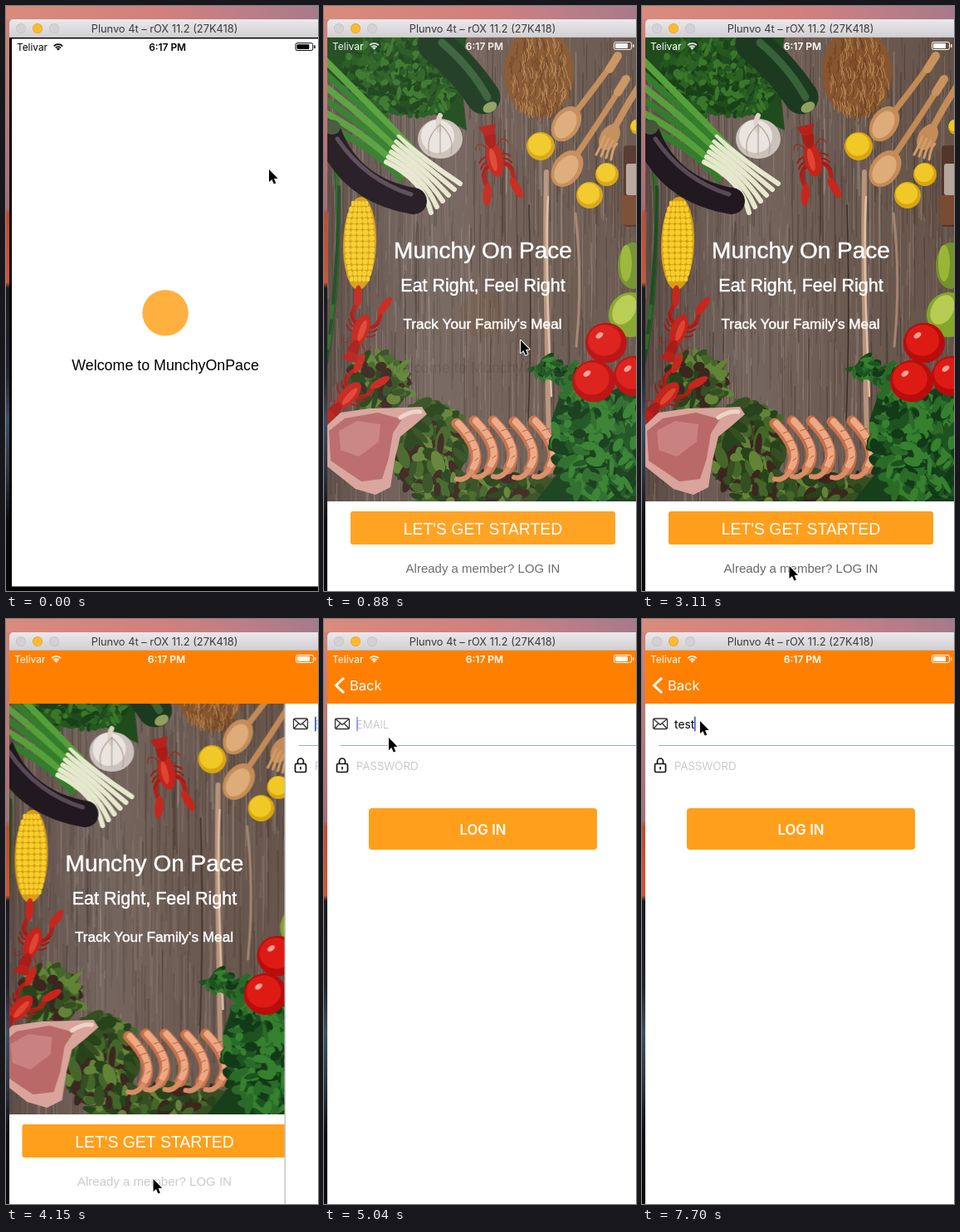
Animation of 376x705 px, one loop 8 s. Source, as an HTML page with a canvas:

```html
<!DOCTYPE html>
<html lang="en">
<head>
<meta charset="utf-8">
<title>App walkthrough</title>
<style>
html, body { margin: 0; width: 100%; height: 100%; overflow: hidden; background: #000; }
canvas { display: block; }
</style>
</head>
<body>
<canvas id="stage" width="376" height="705"></canvas>
<script>
const W = 376, H = 705, LOOP = 8000, TICK = 148;
const SANS = '"Liberation Sans", Arial, sans-serif', UI = 'Inter, sans-serif';
const NAV = '#ff8000', BUTTON = '#ff9f1c';
const stage = document.getElementById('stage').getContext('2d');
let g = stage;

function layer(paint) {
  const canvas = document.createElement('canvas');
  canvas.width = W; canvas.height = H;
  const previous = g;
  g = canvas.getContext('2d');
  paint();
  g = previous;
  return canvas;
}

function seeded(seed) {
  return () => (seed = (seed * 16807) % 2147483647) / 2147483647;
}

function group(paint, { alpha = 1, dx = 0 } = {}) {
  g.save();
  g.globalAlpha *= alpha;
  g.translate(dx, 0);
  paint();
  g.restore();
}

function box(x, y, w, h, color, r = 0) {
  g.fillStyle = color;
  g.beginPath();
  g.roundRect(x, y, w, h, r);
  g.fill();
}

function oval(x, y, rx, ry, color, angle = 0) {
  g.fillStyle = color;
  g.beginPath();
  g.ellipse(x, y, rx, ry, angle, 0, 7);
  g.fill();
}

function shape(points, color) {
  g.fillStyle = color;
  g.beginPath();
  points.forEach(([x, y]) => g.lineTo(x, y));
  g.closePath();
  g.fill();
}

function curve(x1, y1, cx, cy, x2, y2, width, color) {
  g.strokeStyle = color;
  g.lineWidth = width;
  g.lineCap = 'round';
  g.beginPath();
  g.moveTo(x1, y1);
  g.quadraticCurveTo(cx, cy, x2, y2);
  g.stroke();
}

function text(str, x, y, size, color, { font = SANS, weight = 400, align = 'left', heft = 0 } = {}) {
  g.font = `${weight} ${size}px ${font}`;
  g.textAlign = align;
  g.fillStyle = g.strokeStyle = color;
  g.fillText(str, x, y);
  if (heft) { g.lineWidth = heft; g.strokeText(str, x, y); }
}

function gradient(x1, y1, x2, y2, ...stops) {
  const fill = g.createLinearGradient(x1, y1, x2, y2);
  stops.forEach(([at, color]) => fill.addColorStop(at, color));
  return fill;
}

// Food photograph, reduced to flat shapes

function foliage(seed, count, x, y, rx, ry, colors, size) {
  const rnd = seeded(seed);
  for (let i = 0; i < count; i++) {
    const a = rnd() * 6.28, d = Math.sqrt(rnd());
    oval(x + Math.cos(a) * d * rx, y + Math.sin(a) * d * ry, size * (0.5 + rnd()), size * (0.3 + rnd() * 0.4),
      colors[Math.floor(rnd() * colors.length)], rnd() * 3);
  }
}

function wood() {
  box(4, 38, W, 559, gradient(4, 0, W, 0, [0, '#5c4c45'], [0.35, '#75665f'], [0.6, '#6c5b52'], [1, '#66544a']));
  const rnd = seeded(77);
  for (let i = 0; i < 800; i++) {
    const x = 4 + rnd() * 372, y = 20 + rnd() * 560, len = 25 + rnd() * 110;
    g.globalAlpha = 0.15 + rnd() * 0.3;
    curve(x, y, x + rnd() * 4 - 2, y + len / 2, x, y + len, 0.6 + rnd(), rnd() < 0.55 ? '#3b2c27' : '#a99a90');
  }
  g.globalAlpha = 1;
  curve(247, 240, 251, 380, 246, 500, 1.5, '#3a2b24');
  curve(268, 200, 266, 300, 271, 520, 6, '#b7937b');
  curve(270, 230, 266, 300, 274, 470, 2.5, '#e0c0a6');
  curve(303, 250, 312, 330, 304, 410, 3, '#a58470');
}

function crayfish(x, y, angle, scale) {
  g.save();
  g.translate(x, y);
  g.rotate(angle);
  g.scale(scale, scale);
  for (const side of [-1, 1]) {
    curve(side * 4, -8, side * 16, -26, side * 20, -12, 1.2, '#a82019');
    curve(side * 5, 8, side * 22, 14, side * 16, 34, 5, '#b51d17');
    oval(side * 18, 43, 5, 14, '#c8261d', side * -0.3);
    for (let i = 0; i < 3; i++) curve(0, i * 6, side * 14, i * 6 - 4, side * 19, i * 8 + 4, 2, '#9d1c17');
  }
  oval(0, 4, 10, 21, '#c4241c');
  oval(0, -23, 7, 13, '#a91c17');
  shape([[-11, -38], [11, -38], [5, -26], [-5, -26]], '#b8211a');
  oval(-2, 4, 4, 14, '#de4632');
  g.restore();
}

function utensil(hx, hy, rx, ry, angle, ex, ey) {
  curve(hx, hy, (hx + ex) / 2, (hy + ey) / 2 + 3, ex, ey, 7, '#c28a55');
  curve(ex, ey, ex, ey, ex - 10, ey + 16, 10, '#c9935e');
  oval(hx, hy, rx, ry, '#c58c57', angle);
  oval(hx - 1, hy + 1, rx * 0.72, ry * 0.78, '#ddac78', angle);
}

function lemon(x, y, r) {
  oval(x, y, r, r, '#d9a512');
  oval(x - 1, y - 2, r * 0.82, r * 0.8, '#f1c927');
}

function tomato(x, y, r) {
  oval(x, y, r, r * 0.97, '#b80d0d');
  oval(x - 2, y - 3, r * 0.8, r * 0.75, '#dd1b14');
  oval(x - 8, y - 9, 5, 3, '#f4a394', -0.6);
}

function shrimp(x, y) {
  curve(x, y, x + 34, y + 34, x + 18, y + 58, 13, '#c9714a');
  curve(x + 2, y, x + 33, y + 32, x + 20, y + 53, 8, '#eda984');
  curve(x + 18, y + 58, x + 10, y + 70, x, y + 67, 6, '#d98d66');
  for (let i = 0; i < 4; i++) curve(x + 10 + i * 4, y + 12 + i * 11, x + 14 + i * 3, y + 10 + i * 11, x + 20 + i * 2, y + 9 + i * 11, 1, '#b65b38');
}

function photo() {
  g.save();
  g.beginPath();
  g.rect(4, 38, W, 559);
  g.clip();
  wood();

  for (let i = 0; i < 5; i++) curve(6 + i * 3, 130 + i * 22, 30 - i * 3, 280, 3 + i * 2, 430 - i * 18, 4, i % 2 ? '#2f6b27' : '#1f4d20');
  shape([[4, 38], [172, 38], [164, 76], [172, 150], [128, 128], [88, 132], [50, 108], [4, 86]], '#1f4b1d');
  foliage(11, 420, 98, 80, 76, 54, ['#194118', '#2b6122', '#3a772b', '#245820'], 6);

  curve(133, 46, 165, 70, 192, 110, 41, '#1c3a20');
  curve(142, 44, 178, 75, 197, 110, 9, '#39613a');
  oval(200, 122, 9, 6, '#91a05d', -0.5);

  for (let i = 0; i < 6; i++) {
    const y = 64 + i * 16, ex = 164 - i * 7, ey = 214 + i * 6;
    curve(0, y, 58, 122 + i * 9, 112 - i * 4, 178 + i * 6, 8, i % 2 ? '#347d2c' : '#56a03a');
    curve(90 - i * 3, 158 + i * 6, 120, 185 + i * 5, ex, ey + i, 6, '#e6e8cd');
  }
  curve(6, 155, 32, 222, 108, 235, 32, '#211820');
  curve(16, 160, 50, 210, 105, 227, 5, '#574a55');
  oval(10, 146, 10, 9, '#46563a');

  oval(140, 160, 27, 24, '#cbc2bb');
  oval(137, 157, 20, 20, '#ebe4de');
  curve(139, 150, 136, 138, 140, 132, 6, '#ded3c6');
  for (const dx of [-13, 0, 13]) curve(140, 143, 140 + dx * 1.4, 158, 140 + dx, 178, 1.2, '#afa29c');

  oval(259, 80, 42, 54, '#87562f');
  const rnd = seeded(31);
  for (let i = 0; i < 180; i++) {
    const a = rnd() * 6.28, d = Math.sqrt(rnd()), x = 259 + Math.cos(a) * d * 38, y = 80 + Math.sin(a) * d * 50;
    curve(x, y, x + 3, y + 6, x + rnd() * 8 - 4, y + 13, 1, rnd() < 0.5 ? '#6c4223' : '#b98552');
  }

  utensil(292, 142, 16, 23, 0.55, 354, 60);
  utensil(293, 196, 17, 24, 0.6, 364, 88);
  curve(344, 160, 358, 130, 380, 96, 8, '#c48c58');
  oval(344, 158, 11, 17, '#c48c58', 0.55);
  for (let i = 0; i < 4; i++) curve(338 + i * 5, 157 + i * 3, 333 + i * 5, 170, 328 + i * 6, 179 + i * 2, 3, '#d29c67');
  lemon(261, 169, 17); lemon(341, 203, 14); lemon(320, 228, 16); lemon(378, 146, 9);
  box(361, 168, 18, 98, '#53352a', 4);
  box(364, 190, 14, 38, '#b6a69b', 3);
  box(358, 228, 20, 36, '#784b32', 5);

  crayfish(205, 181, -0.22, 1);
  oval(43, 286, 20, 56, '#d99e13', 0.03);
  for (let y = 238; y < 336; y += 7)
    for (let x = -2; x < 3; x++) {
      const spread = 7.4 * Math.sqrt(Math.max(0.1, 1 - ((y - 286) / 58) ** 2));
      oval(43 + x * spread, y, spread * 0.47, 3.2, '#f5cf2c');
    }
  crayfish(43, 394, 0.35 + Math.PI, 0.95);

  const lettuce = ['#27431b', '#456629', '#638337', '#354f22', '#3c2620'];
  foliage(5, 170, 65, 452, 36, 31, lettuce, 10);
  crayfish(27, 472, 0.75 + Math.PI, 0.95);
  foliage(19, 260, 126, 532, 42, 52, lettuce, 11);
  foliage(23, 190, 195, 584, 90, 19, lettuce, 10);

  shape([[4, 505], [20, 490], [55, 485], [95, 484], [118, 483], [124, 492], [108, 506], [92, 519], [85, 548], [80, 580], [62, 589], [38, 582], [4, 555]], '#d8a49b');
  shape([[6, 512], [25, 497], [65, 490], [94, 498], [83, 515], [78, 545], [70, 570], [45, 573], [8, 548]], '#b96968');
  shape([[18, 512], [40, 500], [68, 504], [66, 525], [42, 543], [20, 535]], '#c98280');
  curve(92, 496, 105, 487, 116, 489, 5, '#edd4c8');

  [[160, 503], [181, 500], [204, 500], [229, 501], [253, 500]].forEach(([x, y]) => shrimp(x, y));

  oval(372, 313, 18, 28, '#73922b');
  oval(364, 310, 7, 22, '#9ab638');
  oval(370, 372, 27, 27, '#84a62b', 0.6);
  oval(362, 366, 13, 19, '#b7cc50', 0.5);
  shape([[284, 470], [330, 472], [376, 450], [376, 597], [255, 597], [296, 545], [274, 500]], '#173f1a');
  const parsley = ['#123a18', '#1d5320', '#2a6b29', '#36802f'];
  foliage(41, 360, 338, 530, 62, 66, parsley, 9);
  foliage(43, 35, 271, 437, 17, 14, parsley, 7);
  foliage(47, 40, 300, 455, 20, 26, parsley, 7);
  tomato(340, 406, 25); tomato(374, 446, 25); tomato(325, 452, 26);
  g.restore();
}

// Screens

function statusBar(color) {
  text('Telivar', 10, 52.5, 12, color, { font: UI });
  text('6:17 PM', 193.5, 52.5, 12, color, { font: UI, weight: 600, align: 'center' });
  g.strokeStyle = color;
  g.lineCap = 'butt';
  for (const r of [4.5, 7.5]) {
    g.lineWidth = 1.7;
    g.beginPath();
    g.arc(60.5, 52.5, r, -2.36, -0.78);
    g.stroke();
  }
  shape([[58.3, 50.2], [60.5, 49.3], [62.7, 50.2], [60.5, 52.8]], color);
  g.lineWidth = 1;
  g.beginPath();
  g.roundRect(349.5, 43.5, 21, 9, 2);
  g.stroke();
  box(351, 45, 15, 6, color, 1);
  box(372, 46, 1.5, 4, color, 0.7);
}

function splash() {
  box(4, 38, W, H, '#fff');
  oval(191, 372, 28, 28, '#ffb03f');
  text('Welcome to MunchyOnPace', 191, 442, 18, '#000', { align: 'center' });
  statusBar('#000');
}

const picture = layer(photo);

function home(memberAlpha = 1) {
  box(4, 38, W, H, '#fff');
  g.drawImage(picture, 0, 0);
  const centered = { align: 'center', heft: 0.45 };
  text('Munchy On Pace', 191.5, 304, 28, '#fff', centered);
  text('Eat Right, Feel Right', 191.5, 344, 21.5, '#fff', centered);
  text("Track Your Family's Meal", 191, 389, 17.2, '#fff', centered);
  box(32, 609, 319, 40, BUTTON, 3);
  text("LET'S GET STARTED", 191.5, 637, 19.4, '#fff', { align: 'center' });
  group(() => text('Already a member? LOG IN', 191.5, 683, 15, '#666', { align: 'center' }), { alpha: memberAlpha });
}

function login(typed, caretAlpha) {
  box(4, 102, W, H, '#fff');
  g.strokeStyle = '#333';
  g.lineWidth = 1.3;
  g.lineJoin = 'round';
  g.beginPath();
  g.roundRect(13.5, 120, 17, 12.5, 2);
  g.moveTo(14.5, 121); g.lineTo(22, 127.5); g.lineTo(29.5, 121);
  g.moveTo(14.5, 131.5); g.lineTo(19.5, 126); g.moveTo(29.5, 131.5); g.lineTo(24.5, 126);
  g.stroke();

  g.strokeStyle = '#111';
  g.lineWidth = 1.7;
  g.beginPath();
  g.roundRect(15.5, 174.5, 13, 10, 1.5);
  g.moveTo(18.5, 174); g.lineTo(18.5, 171.5);
  g.arc(22, 171.5, 3.5, Math.PI, 0);
  g.lineTo(25.5, 174);
  g.stroke();
  box(21.2, 178, 1.6, 3.5, '#111');

  box(20, 152, W, 1, '#8fb3ad');
  const field = { font: UI, weight: 300 };
  text('PASSWORD', 39, 181.5, 13.4, '#bdbdc3', field);
  if (typed) text(typed, 39, 131.5, 13.8, '#000', { font: UI });
  else text('EMAIL', 39, 131.5, 13.2, '#bdbdc3', field);
  const caretX = typed ? 38.5 + g.measureText(typed).width : 39;
  group(() => box(caretX, 117.5, 2, 18, '#4a6fe0', 1), { alpha: caretAlpha });

  box(54, 228, 275, 50, BUTTON, 4);
  text('LOG IN', 191.5, 259.5, 16.8, '#fff', { font: UI, weight: 600, align: 'center' });
}

function navBar(p) {
  box(4, 38, W, 64, NAV);
  group(() => {
    text('Back', 31 + 128 * (1 - p), 86, 16.5, '#fff', { font: UI });
    g.strokeStyle = '#fff';
    g.lineWidth = 3;
    g.lineJoin = 'miter';
    g.lineCap = 'butt';
    g.beginPath();
    g.moveTo(24, 71); g.lineTo(14.5, 80); g.lineTo(24, 89);
    g.stroke();
  }, { alpha: p * p * p + 0.08 * p });
}

function desktop() {
  box(0, 0, W, H, '#08070a');
  box(0, 0, W, 40, gradient(0, 0, W, 0, [0, '#d98b7c'], [0.5, '#d27f7e'], [0.72, '#c07e86'], [1, '#a67a8b']));
  box(0, 16, 5, H, gradient(0, 16, 0, H, [0, '#cf8478'], [0.33, '#a96c77'], [0.34, '#c24a30'], [0.46, '#d4542f'],
    [0.47, '#1c1a20'], [0.62, '#22252e'], [0.7, '#3a4f66'], [0.8, '#27323f'], [0.88, '#0b0a0e'], [1, '#060508']));
}

function titleBar() {
  box(4, 16, W, 22, gradient(0, 16, 0, 38, [0, '#ebe8eb'], [1, '#d1cfd1']), [5, 0, 0, 0]);
  box(4, 37.4, W, 0.6, '#b3b0b3');
  [['#c2c0c2', '#d3d1d3'], ['#dfa023', '#fdbb2d'], ['#c2c0c2', '#d3d1d3']].forEach(([rim, fill], i) => {
    oval(18 + i * 20, 27, 6, 6, rim);
    oval(18 + i * 20, 27, 5.3, 5.3, fill);
  });
  text('Plunvo 4t – rOX 11.2 (27K418)', 191, 32, 12.8, '#3a393b', { font: UI, align: 'center' });
}

function pointer([x, y]) {
  g.save();
  g.translate(x, y);
  g.beginPath();
  [[0, 0], [0, 15], [3.4, 12], [5.8, 17.5], [8.3, 16.4], [6, 11], [10.6, 10.7]].forEach(p => g.lineTo(...p));
  g.closePath();
  g.lineJoin = 'round';
  g.strokeStyle = '#fff';
  g.lineWidth = 2;
  g.stroke();
  g.fillStyle = '#000';
  g.fill();
  g.restore();
}

// Timeline in ticks: [tick, value...]

const POINTER = [[3, 317, 197], [4, 282, 290], [5, 237, 403], [8, 237, 403], [9, 226, 440], [10, 203, 560],
  [11, 185, 688], [12, 185, 688], [13, 183, 668], [14, 180, 640], [15, 182, 626], [16, 182, 626], [17, 181, 642],
  [18, 178, 672], [20, 178, 672], [21, 177.5, 675], [30, 177.5, 675], [32, 125, 400], [34, 78, 143], [38, 70, 123]];
const FADE = [[2, 0], [3, 0.06], [4, 0.25], [5, 0.53], [6, 0.96], [7, 1]];
const PUSH = [[27, 0], [28, 0.112], [29, 0.68], [30, 0.93], [31, 1]];
const CARET = [[33, 1], [34, 0.55], [35, 0], [36, 0], [37, 0.6], [38, 1], [48, 1], [49, 0.4], [50, 0], [51, 0], [52, 1]];
const KEYSTROKES = [41, 42, 43, 45];

function at(track, tick) {
  const next = track.findIndex(key => key[0] > tick);
  if (next === 0) return track[0].slice(1);
  if (next < 0) return track[track.length - 1].slice(1);
  const a = track[next - 1], b = track[next], u = (tick - a[0]) / (b[0] - a[0]);
  return a.slice(1).map((v, i) => v + (b[i + 1] - v) * u);
}

function draw(time) {
  const tick = Math.floor((time + 14) / TICK);
  const [fade] = at(FADE, tick), [push] = at(PUSH, tick), [caret] = at(CARET, tick);
  desktop();
  g.save();
  g.beginPath();
  g.rect(4, 38, W, H);
  g.clip();
  if (tick < 1) {
    box(4, 38, W, H, '#000');
    g.transform(0.99, 0, 0, 0.99, 3, 1.6);
    g.beginPath();
    g.rect(4, 38, W, H - 38);
    g.clip();
    splash();
  } else if (push === 0) {
    home(tick === 27 ? 0.35 : 1);
    statusBar('#fff');
    if (fade < 1) group(() => g.drawImage(splashLayer, 0, 0), { alpha: 1 - fade });
  } else {
    if (push < 1) group(() => home(0.35), { dx: -112 * push });
    group(() => {
      if (push < 1) box(2.5, 102, 1.5, H, '#c4c4c4');
      login('test'.slice(0, KEYSTROKES.filter(k => k <= tick).length), caret);
    }, { dx: 375 * (1 - push) });
    navBar(push);
    statusBar('#fff');
  }
  g.restore();
  titleBar();
  pointer(at(POINTER, tick));
}

const splashLayer = layer(splash);
const start = performance.now();
function loop() {
  draw((performance.now() - start) % LOOP);
  requestAnimationFrame(loop);
}
loop();
</script>
</body>
</html>
```
